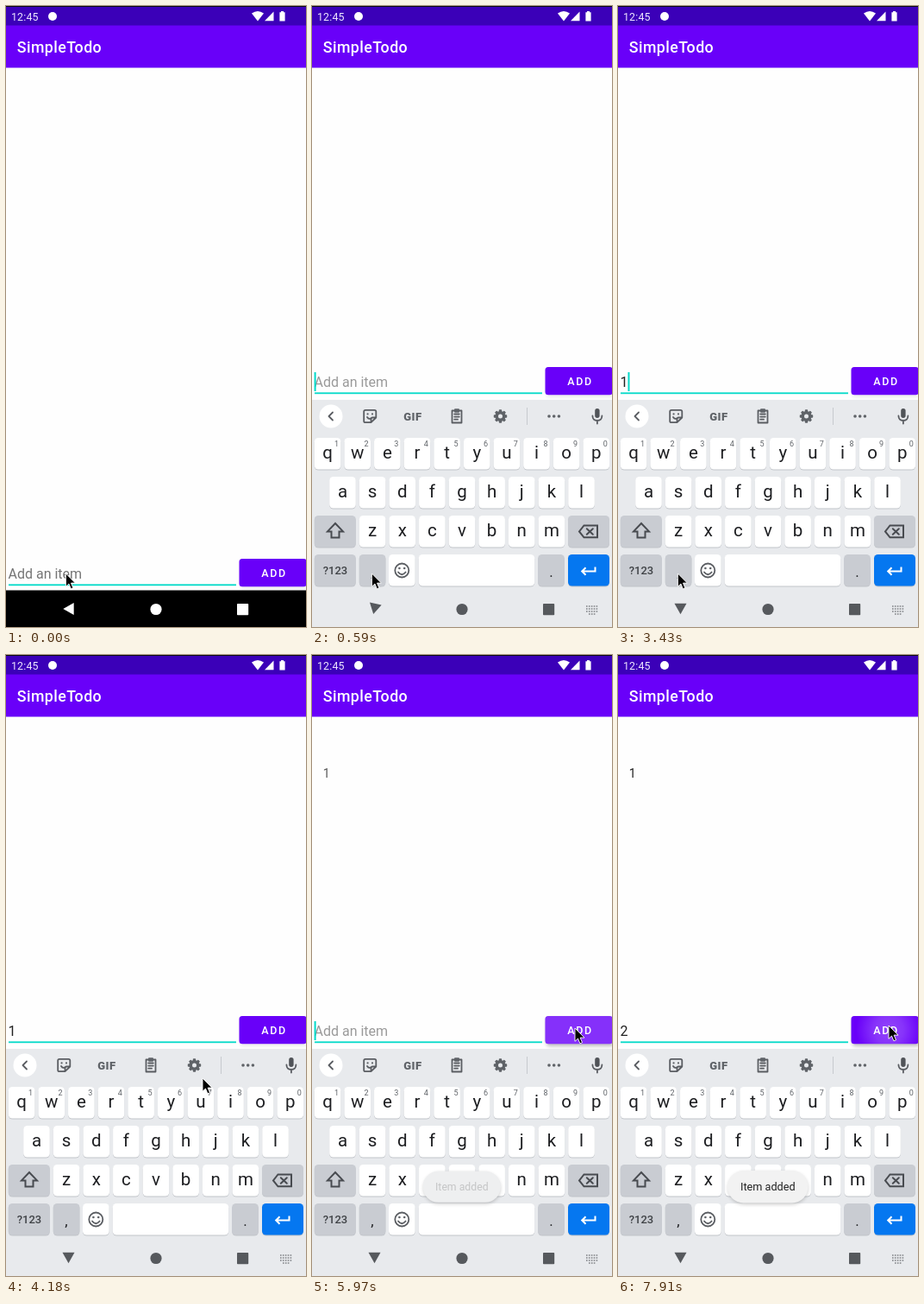
Animation, 348 px wide and 719 px high, one loop 8 s. Source, as an HTML page:

```html
<!DOCTYPE html>
<html lang="en">
<head>
<meta charset="utf-8">
<title>Todo app</title>
<style>
html, body { margin: 0; width: 100%; height: 100%; overflow: hidden; background: #fefefe; }
svg { display: block; width: 348px; height: 719px; font-family: Roboto, sans-serif; }
.key { font-size: 20.5px; fill: #1d1e21; text-anchor: middle; }
.sup { font-size: 9px; fill: #5f6368; text-anchor: middle; }
.line { fill: none; stroke: #5a5d62; stroke-width: 1.8; stroke-linejoin: round; stroke-linecap: round; }
.bold { stroke: #484b50; stroke-width: 2; stroke-linejoin: miter; }
.solid { fill: #5f6368; }
.medium { font-weight: 500; }
</style>
</head>
<body>
<svg viewBox="0 0 348 719">
  <defs>
    <radialGradient id="glow">
      <stop offset="0" stop-color="#fff" stop-opacity=".27"/>
      <stop offset=".45" stop-color="#fff" stop-opacity=".2"/>
      <stop offset="1" stop-color="#fff" stop-opacity="0"/>
    </radialGradient>
    <clipPath id="btnClip"><rect x="270.5" y="418" width="78.3" height="32.2" rx="3.5"/></clipPath>
    <filter id="soft" x="-20%" y="-40%" width="140%" height="190%"><feGaussianBlur stdDeviation="2"/></filter>
  </defs>

  <rect width="348" height="719" fill="#fefefe"/>
  <rect width="348" height="71.5" fill="#6900f9"/>
  <rect width="348" height="22.5" fill="#3b00b8"/>
  <rect width="348" height="1" fill="#0c0c10"/>
  <g fill="#fff">
    <text x="6" y="16.6" font-size="12.4" letter-spacing=".15" fill="#eee6ff">12:45</text>
    <circle cx="54" cy="12" r="5"/>
    <path d="M285 8.6Q292 3.6 299 8.6L292 17.4Z"/>
    <path d="M310.5 6.5V17.2H300Z"/>
    <path d="M319 6h3v1.3h1.6V17.4h-6.2V7.3H319Z"/>
    <text class="medium" x="12.8" y="54.2" font-size="17.8" letter-spacing=".42">SimpleTodo</text>
  </g>

  <text id="item" x="12.8" y="142" font-size="14.2" fill="#222">1</text>

  <g id="field">
    <text id="hint" x="2.5" y="441" font-size="16">Add an item</text>
    <text id="typed" x="2.5" y="441" font-size="16" fill="#212121"></text>
    <rect x="3" y="447.4" width="264" height="1.8" fill="#03dac9"/>
    <rect id="caret" width="2" fill="#03dac9"/>
    <rect id="shade" x="272" y="421" width="78" height="32" rx="4" fill="#000" filter="url(#soft)"/>
    <rect x="270.5" y="418" width="78.3" height="32.2" rx="3.5" fill="#6900f9"/>
    <g clip-path="url(#btnClip)">
      <rect id="wash" x="270" y="418" width="78" height="33" fill="#fff"/>
      <circle id="ripple" cy="434" fill="url(#glow)"/>
    </g>
    <text class="medium" x="296.3" y="438.8" font-size="12.5" letter-spacing="1.55" fill="#fff">ADD</text>
  </g>

  <g id="keyboard">
    <rect y="456" width="348" height="263" fill="#e8eaed"/>
    <circle cx="22" cy="475" r="13.5" fill="#fff"/>
    <path class="line" d="M24 470.5L19.5 475L24 479.5"/>
    <path class="line" d="M62 467.8H72.5Q74.3 467.8 74.3 469.6V476.5L68.5 482.2H62Q60.2 482.2 60.2 480.4V469.6Q60.2 467.8 62 467.8ZM68.5 482V478.2Q68.5 476.5 70.3 476.5H74M64 476Q65.5 478.4 67.4 477.6"/>
    <circle class="solid" cx="64.6" cy="472.4" r="1.1"/><circle class="solid" cx="70" cy="472.4" r="1.1"/>
    <text x="106.3" y="479.6" font-size="13" font-weight="900" letter-spacing=".4" class="solid">GIF</text>
    <path class="line" d="M162.5 468.5H173.5V482.5H162.5ZM165.2 472.5H170.8M165.2 475.6H170.8M165.2 478.7H169"/>
    <rect class="solid" x="165" y="466.3" width="6" height="4.4" rx="1"/>
    <g id="gear"><circle cx="218.5" cy="475" r="4.3" fill="none" stroke="#5f6368" stroke-width="3.6"/></g>
    <path d="M249.5 465V485" stroke="#c6c9ce"/>
    <g class="solid"><circle cx="275" cy="475" r="1.8"/><circle cx="280.7" cy="475" r="1.8"/><circle cx="286.4" cy="475" r="1.8"/></g>
    <rect x="328.2" y="466" width="5.4" height="11" rx="2.7" fill="#505358"/>
    <path class="line" d="M325.4 474.5Q325.6 480 330.9 480Q336.2 480 336.4 474.5M330.9 480V483.5"/>
    <g id="keys"></g>
    <path class="line bold" d="M27 599L36 608.4H31.5V615.5H22.5V608.4H18Z"/>
    <path class="line bold" d="M315.5 601.5H331V615.3H315.5L310 608.4ZM318.8 605.2L325.8 611.8M325.8 605.2L318.8 611.8"/>
    <text x="27" y="658.2" font-size="13" class="medium" text-anchor="middle" fill="#3f4246">?123</text>
    <text class="key" x="70" y="661" style="font-size:17px">,</text>
    <text class="key" x="277.5" y="661" style="font-size:17px">.</text>
    <circle class="line" cx="104.3" cy="653.5" r="8"/>
    <path class="line" d="M100 655.5Q104.3 661 108.6 655.5"/>
    <circle class="solid" cx="101.4" cy="651" r="1.3"/><circle class="solid" cx="107.2" cy="651" r="1.3"/>
    <path d="M328.5 649.5V654.5H313.5M317.5 650.3L313.2 654.5L317.5 658.7" fill="none" stroke="#fff" stroke-width="2"/>
  </g>

  <rect id="navBg" y="676.5" width="348" height="43" fill="#000"/>
  <g id="nav">
    <path id="back" d="M-6.2 0L6.2 -7V7Z"/>
    <circle cx="174" cy="698.5" r="6.6"/>
    <rect x="268" y="692" width="13.2" height="13.2" rx=".8"/>
    <path id="imeIcon" d="M318 695H332M318 698H332M318 701H332M321 704H329" fill="none" stroke="#7d8084" stroke-width="1.5" stroke-dasharray="1.6 1.3"/>
  </g>

  <g id="toast">
    <rect x="128" y="599" width="92" height="37" rx="18.5" fill="#000" opacity=".22" filter="url(#soft)"/>
    <rect id="pill" x="127" y="597" width="93.5" height="37.5" rx="18.7"/>
    <text id="toastText" x="173.8" y="620.3" font-size="12.7" text-anchor="middle" fill="#222">Item added</text>
  </g>

  <path id="mouse" d="M0 0V15.3L3.5 12L5.9 17.8L8.5 16.7L6.1 11.1H11Z" fill="#000" stroke="#fff" stroke-width=".9"/>
</svg>

<script>
const LOOP = 8000;
const el = id => document.getElementById(id);
const set = (id, attrs) => {
  for (const name in attrs) el(id).setAttribute(name, attrs[name]);
};

function add(parent, tag, attrs, text = '') {
  const node = document.createElementNS('http://www.w3.org/2000/svg', tag);
  for (const name in attrs) node.setAttribute(name, attrs[name]);
  node.textContent = text;
  el(parent).append(node);
}

function keycap(x, y, w, fill) {
  add('keys', 'rect', { x, y: y + 1, width: w, height: 36.5, rx: 4.6, fill: '#c2c5ca' });
  add('keys', 'rect', { x, y, width: w, height: 36.5, rx: 4.6, fill });
}

const PITCH = 34.63;
[['qwertyuiop', 2.8, 500], ['asdfghjkl', 20.2, 545], ['zxcvbnm', 54.8, 590]].forEach(([letters, left, y], row) => {
  [...letters].forEach((letter, i) => {
    const x = left + PITCH * i;
    keycap(x, y, 30.6, '#fff');
    add('keys', 'text', { class: 'key', x: x + 15.3, y: y + 24 }, letter);
    if (!row) add('keys', 'text', { class: 'sup', x: x + 25.7, y: 510 }, (i + 1) % 10);
  });
});

const GREY = '#c9ccd2';
[[2.8, 590, 48, GREY], [297, 590, 48, GREY], [2.8, 635, 48, GREY], [54.8, 635, 30.6, GREY],
 [89, 635, 30.6, '#fff'], [123.7, 635, 134.5, '#fff'], [262.2, 635, 30.6, GREY],
 [297, 635, 48, '#0577f0']].forEach(k => keycap(...k));

for (let a = 0; a < 360; a += 45) {
  add('gear', 'rect', { x: 216.8, y: 467.3, width: 3.4, height: 4, rx: .8, fill: '#5f6368', transform: `rotate(${a} 218.5 475)` });
}

// Each step keeps the values of the one before unless it changes them.
const start = {
  drop: 222, hint: '#757575', text: '', scroll: 0, caret: 0, item: 0,
  kbY: 263, kbAlpha: 0, navAlpha: 1, navFill: '#fff', turn: 0,
  mouse: [69.4, 657], wash: 0, ripple: 0, lift: .07,
  toast: 0, toastText: 0, toastScale: 1, pill: '#f2f2f2'
};
const steps = [
  [0, {}],
  [300, { drop: 0, hint: '#9a9a9a', caret: 1, kbY: 240, kbAlpha: .25 }],
  [440, { kbY: 112, kbAlpha: .64, navAlpha: .57, navFill: '#8c8c8c' }],
  [590, { kbY: 0, kbAlpha: 1, navAlpha: 0, navFill: '#56595d', turn: -78 }],
  [730, { turn: -90 }],
  [1180, { caret: 0 }],
  [1480, { text: '1', caret: 1 }],
  [1930, { caret: 0 }],
  [2230, { scroll: 19, caret: 1 }],
  [2830, { caret: 0 }],
  [3280, { caret: 1 }],
  [3430, { scroll: 0 }],
  [3880, { caret: 0, mouse: [88, 641] }],
  [4030, { mouse: [148, 575] }],
  [4180, { mouse: [228, 490] }],
  [4330, { mouse: [286, 444], caret: 1 }],
  [4480, { mouse: [305, 432] }],
  [4930, { caret: 0 }],
  [5530, { caret: 1 }],
  [5820, { ripple: 36, lift: .25 }],
  [5970, { ripple: 0, wash: .19, text: '', item: .75, toast: 1, toastText: .2, toastScale: .965, pill: '#eeeff0' }],
  [6120, { wash: .1, item: 1, toastText: 1, toastScale: 1, pill: '#f2f2f2' }],
  [6270, { wash: .04, lift: .15 }],
  [6410, { wash: 0, caret: 0 }],
  [6560, { lift: .07 }],
  [6860, { caret: 1 }],
  [7310, { caret: 0 }],
  [7460, { text: '2', caret: 1 }],
  [7610, { mouse: [310, 445] }],
  [7760, { mouse: [314, 433] }],
  [7910, { mouse: [314, 429], caret: 0, ripple: 38, lift: .25 }]
];

let state = start;
const timeline = steps.map(([time, change]) => [time, state = { ...state, ...change }]);

function draw(s) {
  const newLine = s.scroll > 0;
  set('field', { transform: `translate(0 ${s.drop})` });
  set('hint', { fill: s.hint, opacity: s.text ? 0 : 1 });
  el('typed').textContent = s.text;
  set('typed', { y: 441 - s.scroll });
  set('caret', {
    x: s.text && !newLine ? 11.5 : 2.6,
    y: newLine ? 426 : 424,
    height: newLine ? 20 : 22,
    opacity: s.caret
  });
  set('shade', { opacity: s.lift });
  set('wash', { opacity: s.wash });
  set('ripple', { cx: s.mouse[0], r: s.ripple });
  set('item', { opacity: s.item });
  set('keyboard', { transform: `translate(0 ${s.kbY})`, opacity: s.kbAlpha });
  set('navBg', { opacity: s.navAlpha });
  set('nav', { fill: s.navFill });
  set('back', { transform: `translate(72.5 698) rotate(${s.turn})` });
  set('imeIcon', { opacity: s.navAlpha < 1 ? 1 : 0 });
  set('toast', { opacity: s.toast, transform: `translate(173.8 616) scale(${s.toastScale}) translate(-173.8 -616)` });
  set('pill', { fill: s.pill });
  set('toastText', { opacity: s.toastText });
  set('mouse', { transform: `translate(${s.mouse})` });
}

let shown;
function frame() {
  const t = performance.now() % LOOP;
  const [, now] = timeline.findLast(([time]) => time <= t);
  if (now !== shown) draw(shown = now);
  requestAnimationFrame(frame);
}
frame();
</script>
</body>
</html>
```
